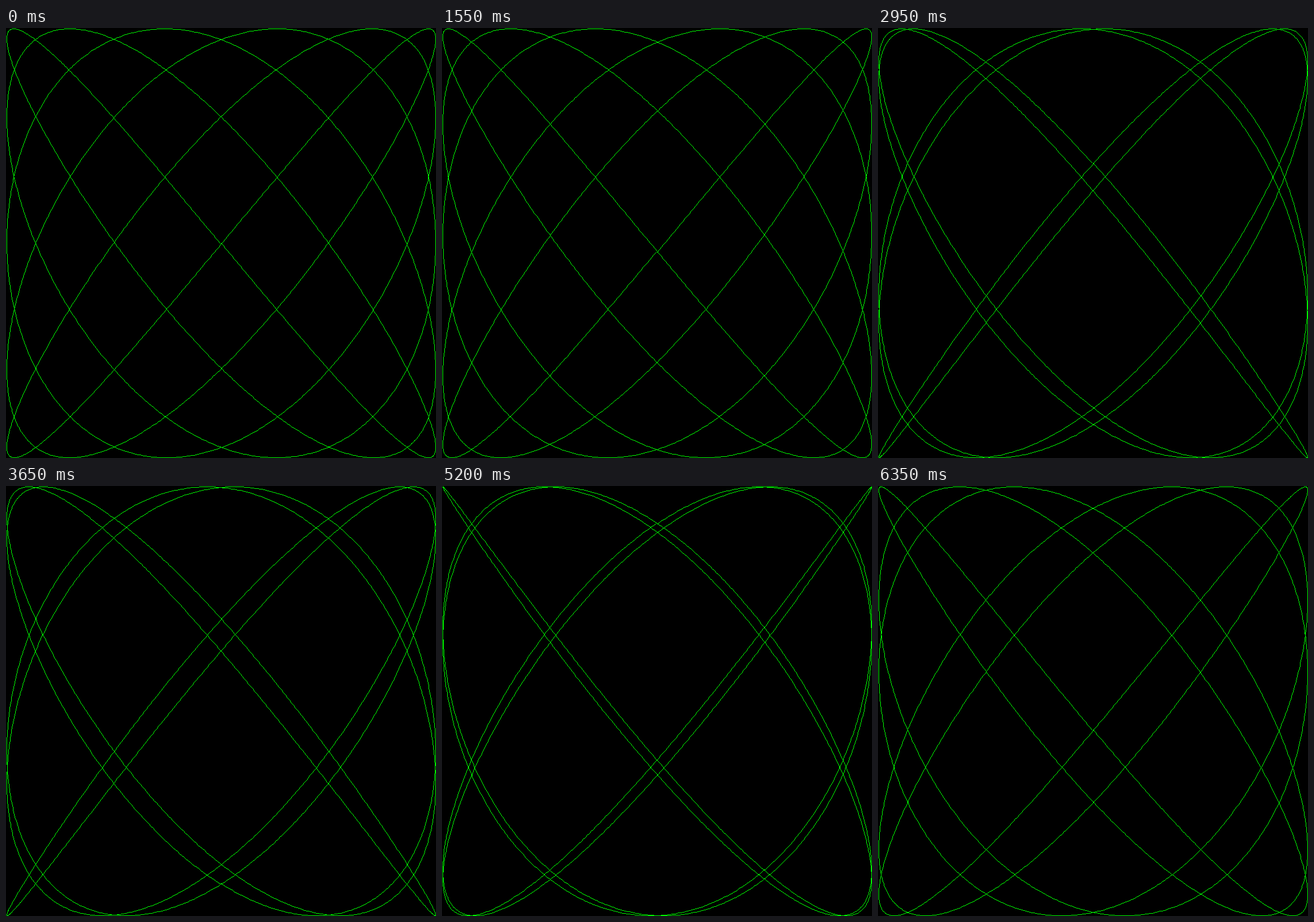
An HTML page with a canvas that plays this animation: 748x748 px, repeating every 6400 ms.

```html
<!DOCTYPE html>
<html lang="en">
<head>
<meta charset="utf-8">
<title>Lissajous figure</title>
<style>
  html, body { margin: 0; width: 100%; height: 100%; overflow: hidden; background: #000; }
  canvas { display: block; width: 748px; height: 748px; }
</style>
</head>
<body>
<canvas id="stage" width="748" height="748"></canvas>
<script>
  const SIDE = 748;
  const CENTRE = SIDE / 2;
  const RADIUS = CENTRE - 1;
  const T_END = 5 * 2 * Math.PI;
  const T_STEP = 0.01;
  const FREQ = 1.20021;
  const PHASE_STEP = 0.1;
  const STEPS = 128;
  const STEP_MS = 50;

  const ctx = document.getElementById('stage').getContext('2d');
  const image = ctx.createImageData(SIDE, SIDE);
  const pixels = new Uint32Array(image.data.buffer);
  const BLACK = 0xff000000; // ABGR
  const GREEN = 0xff00ff00;

  const toPixel = v => Math.round(CENTRE + v * RADIUS);

  // One-pixel line without antialiasing: one pixel per step of the longer axis.
  function line(x0, y0, x1, y1) {
    const dx = x1 - x0;
    const dy = y1 - y0;
    const n = Math.max(Math.abs(dx), Math.abs(dy), 1);
    for (let i = 0; i <= n; i++) {
      const x = Math.round(x0 + dx * i / n);
      const y = Math.round(y0 + dy * i / n);
      pixels[y * SIDE + x] = GREEN;
    }
  }

  function draw(phase) {
    pixels.fill(BLACK);
    let x = toPixel(0);
    let y = toPixel(Math.sin(phase));
    for (let t = T_STEP; t < T_END; t += T_STEP) {
      const nextX = toPixel(Math.sin(t));
      const nextY = toPixel(Math.sin(t * FREQ + phase));
      line(x, y, nextX, nextY);
      x = nextX;
      y = nextY;
    }
    ctx.putImageData(image, 0, 0);
  }

  const start = performance.now();
  let shown = -1;

  function tick() {
    const step = Math.floor((performance.now() - start) / STEP_MS) % STEPS;
    if (step !== shown) {
      shown = step;
      draw(step * PHASE_STEP);
    }
    requestAnimationFrame(tick);
  }
  tick();
</script>
</body>
</html>
```
